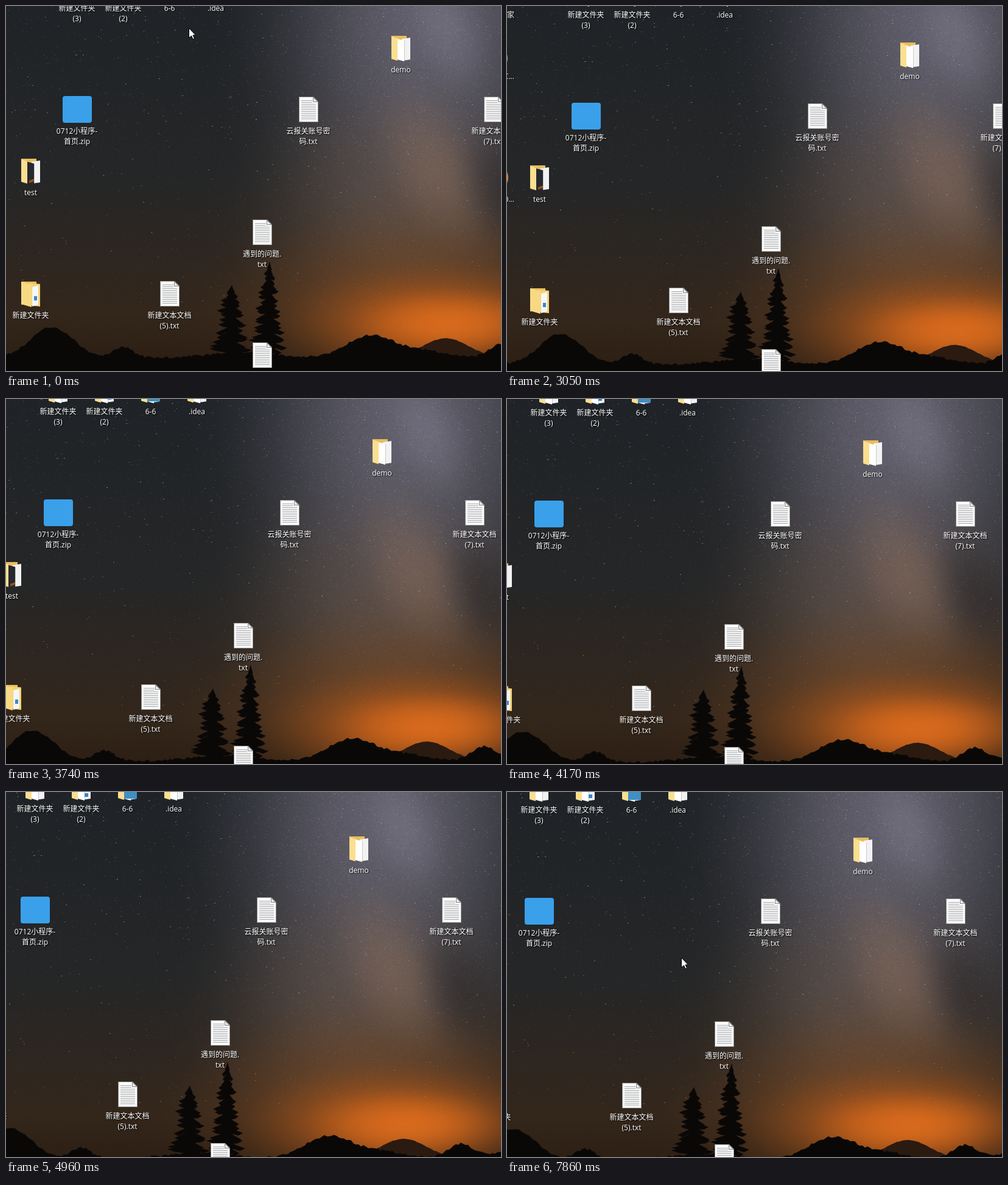
Recreate the animation shown at these times as an HTML page with a canvas. Size 813 px wide and 600 px high, loop 8 s.

```html
<!DOCTYPE html>
<html lang="zh">
<head>
<meta charset="utf-8">
<title>Desktop</title>
<style>
  html, body { margin: 0; width: 100%; height: 100%; overflow: hidden; background: #1e2024; }
  canvas { display: block; }
</style>
</head>
<body>
<canvas id="stage" width="813" height="600"></canvas>
<script>
const LOOP = 8000;
const PAD = 40;
const LAND = '#0a0807';
const stage = document.getElementById('stage').getContext('2d');

// Key poses of the view as [time, x, y], eased between and redrawn every TICK ms
const TICK = 137;
const PAN_START = 2500;
const PAN = [[2363, 0, 0], [3048, 13, 11], [3733, -31, 17], [4692, -75, 21], [4966, -64, 26]];

// Hills as [centre, height, spread]
const HILLS = [
  [75, 51, 48], [192, 17, 24], [390, 9, 70], [600, 37, 56],
  [690, 10, 50], [815, 23, 28], [885, 9, 45]
];
const FAR_HILLS = [[722, 32, 52]];

const mix = (a, b, p) => a + (b - a) * p;
const smooth = p => p * p * (3 - 2 * p);

function seeded(seed) {
  return () => {
    seed = (seed + 0x6D2B79F5) | 0;
    let v = Math.imul(seed ^ (seed >>> 15), 1 | seed);
    v = (v + Math.imul(v ^ (v >>> 7), 61 | v)) ^ v;
    return ((v ^ (v >>> 14)) >>> 0) / 4294967296;
  };
}

function layer(draw) {
  const canvas = document.createElement('canvas');
  canvas.width = 980;
  canvas.height = 680;
  const c = canvas.getContext('2d');
  c.translate(PAD, PAD);
  draw(c);
  return canvas;
}

function poly(c, color, points) {
  c.fillStyle = color;
  c.beginPath();
  for (const [x, y] of points) c.lineTo(x, y);
  c.closePath();
  c.fill();
}

function rect(c, color, x, y, w, h) {
  c.fillStyle = color;
  c.fillRect(x, y, w, h);
}

function disc(c, color, x, y, r) {
  c.fillStyle = color;
  c.beginPath();
  c.arc(x, y, r, 0, Math.PI * 2);
  c.fill();
}

// A sheet standing at an angle: left edge x0, right edge x1, lowered by drop on the right
function sheet(c, color, x0, x1, top, bottom, drop) {
  poly(c, color, [[x0, top], [x1, top + drop], [x1, bottom + drop], [x0, bottom]]);
}

// Soft elliptical light; rgb is "r,g,b"
function glow(c, x, y, rx, ry, turn, rgb, alpha) {
  c.save();
  c.translate(x, y);
  c.rotate(turn);
  c.scale(rx, ry);
  const g = c.createRadialGradient(0, 0, 0, 0, 0, 1);
  for (let i = 0; i <= 8; i++) {
    const fall = (1 + Math.cos(Math.PI * i / 8)) / 2;
    g.addColorStop(i / 8, `rgba(${rgb},${alpha * fall})`);
  }
  c.fillStyle = g;
  c.fillRect(-1, -1, 2, 2);
  c.restore();
}

function drawSky(c) {
  const g = c.createLinearGradient(0, -30, 0, 600);
  g.addColorStop(0, '#1f2327');
  g.addColorStop(0.5, '#252627');
  g.addColorStop(0.85, '#33261b');
  g.addColorStop(1, '#2b1d12');
  rect(c, g, -PAD, -PAD, 980, 680);

  glow(c, 690, 20, 360, 500, 0, '122,118,134', 0.72);
  glow(c, 650, 340, 330, 270, 0, '126,100,82', 0.45);
  glow(c, 725, 40, 75, 130, -0.4, '150,148,166', 0.25);
  glow(c, 705, 270, 100, 180, -0.45, '156,120,98', 0.35);
  glow(c, 815, 300, 80, 140, -0.3, '36,32,34', 0.4);
  glow(c, 690, 500, 420, 200, 0, '132,76,32', 0.65);
  glow(c, 710, 522, 290, 110, 0, '200,94,22', 0.75);
  glow(c, 730, 522, 190, 66, 0, '228,112,30', 0.75);
}

function drawStars(c) {
  const rand = seeded(712);
  // Fine dust, dense along the bright band and thinning toward the horizon
  for (let i = 0; i < 42000; i++) {
    const x = Math.floor(rand() * 930 - 30);
    const y = Math.floor(rand() * 560 - 30);
    const band = Math.exp(-(((x - 670) / 190) ** 2));
    if (rand() > 0.15 + band) continue;
    const low = Math.max(0, y / 530);
    c.globalAlpha = (0.05 + 0.25 * rand() ** 2) * (1 - 0.75 * low * low);
    const light = low > 0.45 ? '#dcae88' : '#d0cfda';
    rect(c, rand() < 0.6 ? light : '#181820', x, y, 1, 1);
  }
  for (let i = 0; i < 480; i++) {
    const x = Math.floor(rand() * 930 - 30);
    const y = Math.floor(rand() ** 1.2 * 520 - 30);
    c.globalAlpha = 0.25 + 0.4 * rand();
    rect(c, y > 330 || rand() < 0.1 ? '#c08858' : '#b8bac2', x, y, rand() < 0.4 ? 2 : 1, 1);
  }
  c.globalAlpha = 1;
}

function drawTree(c, x, top, base, left, right, seed) {
  const rand = seeded(seed);
  const count = Math.round((base - top) / 8);
  poly(c, LAND, [[x, top - 3], [x + 5, base + 20], [x - 5, base + 20]]);
  for (let i = 1; i <= count; i++) {
    const p = i / count;
    const y = mix(top, base, p);
    for (const reach of [-left, right]) {
      const tip = reach * p ** 0.6 * mix(0.6, 1.12, rand());
      const sag = mix(-3, 4, rand());
      poly(c, LAND, [
        [x, y - 10], [x + tip * 0.45, y - 5 + sag / 2], [x + tip, y + sag],
        [x + tip * 0.7, y + 4 + sag], [x + tip * 0.35, y + 3], [x, y + 5]
      ]);
    }
  }
}

function drawHills(c, color, hills, rough) {
  const rand = seeded(38);
  const outline = [[-PAD, 640]];
  for (let x = -PAD; x <= 920; x += 4) {
    let y = 578 + rough * (rand() - 0.5);
    for (const [centre, height, spread] of hills) {
      y -= height * Math.exp(-(((x - centre) / spread) ** 2));
    }
    outline.push([x, y]);
  }
  poly(c, color, [...outline, [920, 640]]);
}

function drawLand(c) {
  drawHills(c, '#2a1a10', FAR_HILLS, 1);
  drawHills(c, LAND, HILLS, 4);
  drawTree(c, 371, 461, 566, 41, 31, 5);
  drawTree(c, 433, 422, 568, 35, 27, 9);
}

function textFile(c, x, y) {
  c.save();
  c.translate(x - 16, y - 22);
  poly(c, '#8a8a8a', [[0, 0], [24, 0], [32, 8], [32, 42], [0, 42]]);
  poly(c, '#fbfbfb', [[1, 1], [23, 1], [31, 9], [31, 41], [1, 41]]);
  for (let i = 0; i < 11; i++) rect(c, '#a3a5a8', 4, 6 + i * 3, i < 2 ? 18 : 24, 1);
  poly(c, '#8a8a8a', [[23, 0], [32, 9], [23, 9]]);
  poly(c, '#e9e9e9', [[24, 2], [30, 8], [24, 8]]);
  c.restore();
}

// kind picks what peeks out of the folder
function folder(c, x, y, kind) {
  c.save();
  c.translate(x - 16, y - 21);
  sheet(c, '#e8bd5c', 0, 25, 0, 38, 0);
  if (kind === 'full') {
    sheet(c, '#f3d275', 12, 31, 2, 39, 2);
    sheet(c, '#f4f6f8', 18, 28, 9, 41, -3);
    rect(c, '#3f87c4', 21, 24, 5, 7);
    sheet(c, '#f7d984', 0, 17, 0, 37, 5);
  } else {
    sheet(c, '#f2f2f2', 17, 31, 5, 41, -2);
    sheet(c, kind === 'photo' ? '#25282e' : '#ffffff', 10, 21, 5, 39, 3);
    rect(c, '#c6c9cc', 21, 8, 1, 32);
    if (kind === 'photo') sheet(c, '#9a4d20', 13, 21, 36, 40, -3);
    if (kind === 'blue') rect(c, '#2f86c8', 21, 30, 6, 6);
    if (kind === 'art') sheet(c, '#3f8fc4', 10, 31, 6, 39, 0);
    sheet(c, '#fadf90', 0, 10, 1, 38, 3);
  }
  c.restore();
}

function archive(c, x, y) {
  c.fillStyle = '#3aa0ea';
  c.beginPath();
  c.roundRect(x - 24, y - 23, 48, 44, 4);
  c.fill();
}

function label(c, x, y, lines, align = 'center') {
  c.save();
  c.font = '12px "Open Sans", "Noto Sans CJK SC", "Noto Sans CJK JP", "Noto Sans CJK", sans-serif';
  c.textAlign = align;
  c.shadowColor = '#000';
  c.shadowOffsetX = 1;
  c.shadowOffsetY = 1;
  c.shadowBlur = 2;
  c.fillStyle = '#fff';
  lines.forEach((line, i) => c.fillText(line, x, y + 4 + i * 17));
  c.restore();
}

// [column, row, icon, label lines, icon kind]
const ITEMS = [
  [1, 0, folder, ['新建文件夹', '(3)']],
  [2, 0, folder, ['新建文件夹', '(2)'], 'blue'],
  [3, 0, folder, ['6-6'], 'art'],
  [4, 0, folder, ['.idea']],
  [8, 1, folder, ['demo']],
  [1, 2, archive, ['0712小程序-', '首页.zip']],
  [6, 2, textFile, ['云报关账号密', '码.txt']],
  [10, 2, textFile, ['新建文本文档', '(7).txt']],
  [0, 3, folder, ['test'], 'photo'],
  [5, 4, textFile, ['遇到的问题.', 'txt']],
  [0, 5, folder, ['新建文件夹'], 'full'],
  [3, 5, textFile, ['新建文本文档', '(5).txt']],
  [5, 6, textFile, []]
];
const columnX = col => 41 + col * 76;
const rowY = row => 4 + row * 101;

function drawIcons(c) {
  for (const [col, row, icon, lines, kind] of ITEMS) {
    icon(c, columnX(col), rowY(row) - 35, kind);
    label(c, columnX(col) - 0.5, rowY(row), lines);
  }
  // The column that only just reaches into view
  disc(c, '#a9adb2', columnX(-1), rowY(1) - 30, 23);
  disc(c, '#e8863a', columnX(-1), rowY(3) - 36, 24);
  [[0, '家'], [1, 'C...'], [3, '0...']].forEach(([row, text]) => label(c, -1, rowY(row), [text], 'right'));
}

function drawPointer(c, x, y) {
  c.save();
  c.translate(x + 0.5, y + 0.5);
  c.beginPath();
  for (const [px, py] of [[0, 0], [0, 16], [4, 12.5], [6.5, 18], [9, 17], [6.5, 11.5], [11, 11.5]]) {
    c.lineTo(px, py);
  }
  c.closePath();
  c.fillStyle = '#fff';
  c.fill();
  c.strokeStyle = '#000';
  c.lineWidth = 1;
  c.stroke();
  c.restore();
}

function viewAt(time) {
  const t = PAN_START + Math.floor((time - PAN_START) / TICK) * TICK;
  if (t < PAN_START) return [0, 0];
  const next = PAN.findIndex(key => key[0] > t);
  if (next < 0) return PAN[PAN.length - 1].slice(1);
  const [t0, x0, y0] = PAN[next - 1];
  const [t1, x1, y1] = PAN[next];
  const p = (t - t0) / (t1 - t0);
  return [Math.round(mix(x0, x1, smooth(p))), Math.round(mix(y0, y1, p))];
}

// The pointer jumps; null while it is off the stage
function pointerAt(t) {
  if (t < 120) return [300, 36];
  if (t < 270) return [12, -6];
  if (t >= 420 && t < 570 || t >= 1720 && t < 1840) return [-9, -5];
  if (t < 5680) return null;
  if (t < 5990) return [53, -6];
  if (t < 6640) return [70, 6];
  if (t < 6790) return [79, 17];
  if (t < 6910) return [116, 82];
  if (t < 7060) return [153, 148];
  if (t < 7740) return [226, 283];
  return t < 7860 ? [256, 277] : [286, 272];
}

const backdrop = layer(c => {
  drawSky(c);
  drawStars(c);
  drawLand(c);
});
const icons = layer(drawIcons);

// Lights up the first folder while the pointer is over it
function drawHover(c, pointer, dx, dy) {
  const left = columnX(1) + dx - 38;
  const bottom = rowY(0) + dy + 27;
  const [x, y] = pointer;
  if (x < left || x > left + 76 || y < 0 || y > bottom) return;
  rect(c, 'rgba(120,165,195,0.26)', left, 0, 76, bottom);
  c.strokeStyle = 'rgba(140,180,205,0.5)';
  c.lineWidth = 1;
  c.strokeRect(left + 0.5, -5.5, 75, bottom + 5);
}

function render() {
  const t = performance.now() % LOOP;
  const [dx, dy] = viewAt(t);
  const pointer = pointerAt(t);
  stage.drawImage(backdrop, dx - PAD, dy - PAD);
  if (pointer) drawHover(stage, pointer, dx, dy);
  stage.drawImage(icons, dx - PAD, dy - PAD);
  if (pointer) drawPointer(stage, ...pointer);
  requestAnimationFrame(render);
}
render();
</script>
</body>
</html>
```
